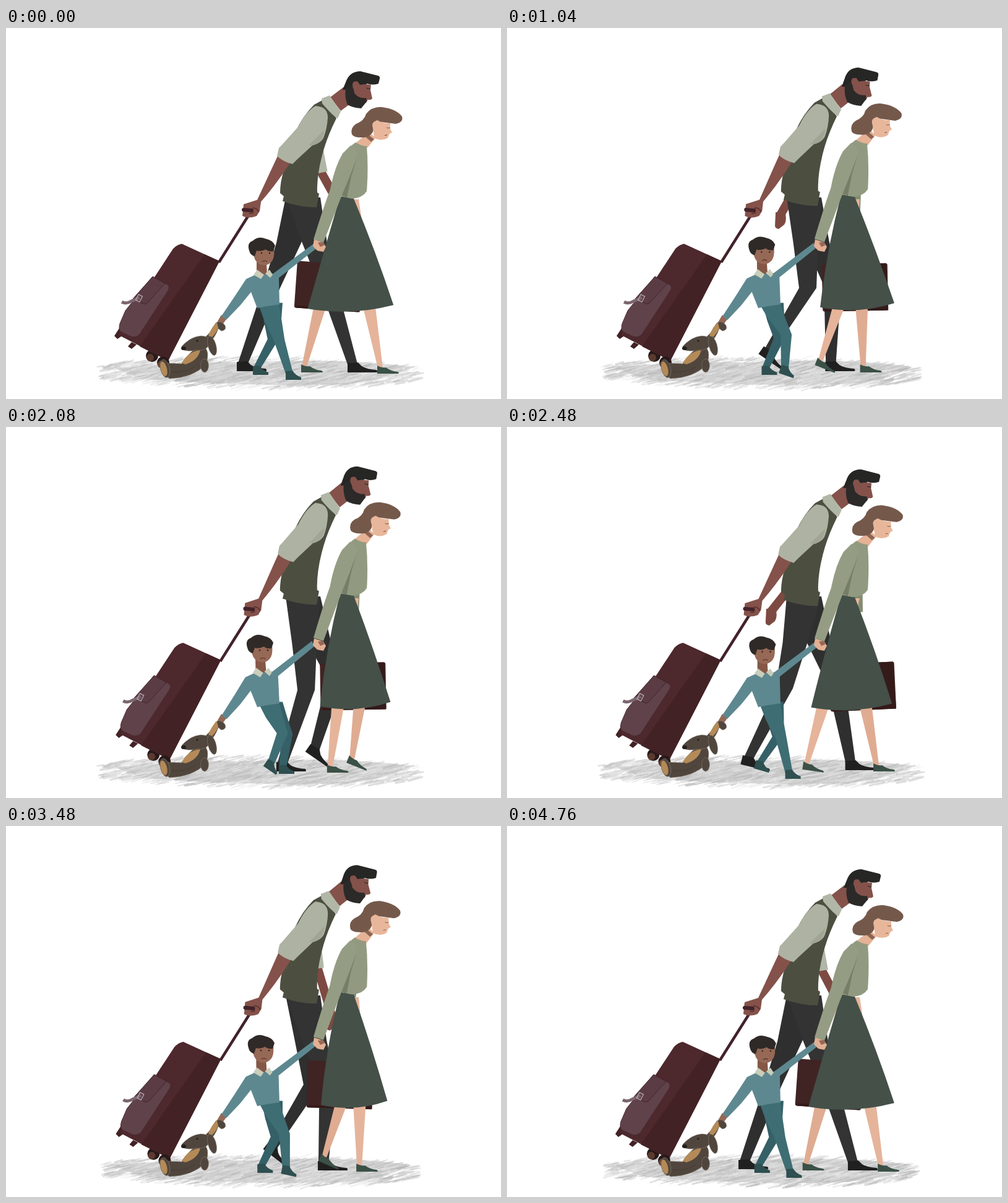
An HTML page for the animation above (4800 ms loop, 800 by 600 pixels).

```html
<!DOCTYPE html>
<html lang="en">
<head>
<meta charset="utf-8">
<title>Family walking</title>
<style>
html, body { margin: 0; width: 100%; height: 100%; overflow: hidden; background: #fff; }
svg { position: absolute; left: 0; top: 0; display: block; }
</style>
</head>
<body>
<svg width="800" height="600" viewBox="0 0 800 600">
  <g id="ground" fill="none" stroke-linecap="round"></g>

  <!-- man -->
  <g>
    <path id="manFarFore" stroke="#7d4a42" stroke-width="14" fill="none" stroke-linejoin="round"/>
    <path id="manFarHand" fill="#7d4a42" d="M-8,-14 L7,-15 Q11,-2 6,6 L-3,13 Q-10,12 -9,6Z"/>
    <path id="manFarSleeve" stroke="#b1b7a6" stroke-width="20" fill="none"/>
  </g>
  <g id="manLegs"></g>
  <g id="manHead">
    <path fill="#84524a" d="M545,96 L524,112 L541,134 L560,120 L562,98Z"/>
    <path fill="#262625" d="M544,100 L549,88 Q555,70 573,70 L601,77 Q605,78 604,82 L602,90 Q592,93 584,90 L570,98 L549,100Z"/>
    <path fill="#84524a" d="M564,88 L568,86 L572,92 Q580,90 590,92 L589,100 L592,114 Q590,117 585,116 L582,121 L560,116Z"/>
    <path fill="#2b2a29" d="M561,90 L549,99 Q547,113 552,124 Q560,129 574,130 L583,119 L582,113 Q570,115 563,105Z"/>
    <path fill="#84524a" d="M568,87 Q560,84 560,93 Q561,101 567,101 L572,92Z"/>
    <path fill="none" stroke="#2b2a29" stroke-width="1.2" d="M583,97 Q586,99 589,98"/>
  </g>
  <g id="manTorso">
    <path fill="#4c4f40" d="M498,124 L511,117 L534,146 Q521,172 514,195 Q502,235 503,266 L506,268 L502,290 Q474,290 447,280 L449,272 L443,267 Q443,245 452,222 Q462,160 498,124Z"/>
    <path fill="#b1b7a6" d="M510,114 L523,109 L541,135 L536,146 Q529,143 511,122Z"/>
  </g>
  <g id="case">
    <path stroke="#42222a" stroke-width="4.5" d="M397,295 L344,379"/>
    <circle cx="236" cy="530" r="10" fill="#281a1a"/><circle cx="233" cy="533" r="6" fill="#5b3a2e"/>
    <path fill="#432225" d="M184,484 L175,498 L180,503 L190,496Z M203,508 L197,515 L203,519 L211,512Z"/>
    <path fill="#4d282d" d="M284,349 L345,377 L262,538 L183,497 L184,488 L270,357 Q277,350 284,349Z"/>
    <path fill="#432225" d="M321,366 L345,377 L262,538 L216,515Z"/>
    <circle cx="254" cy="541" r="10" fill="#281a1a"/><circle cx="251" cy="544" r="6" fill="#6b4633"/>
    <path fill="#60424a" stroke="#4a2c33" stroke-width="1" d="M237,402 L262,416 Q265,420 261,426 L216,495 Q211,501 202,499 L187,492 Q181,489 184,478 L193,457Z"/>
    <path fill="#5b3c45" stroke="#3f242b" stroke-width="1" d="M237,402 L257,413 L229,444 Q225,448 220,445 L205,438Z"/>
    <path fill="none" stroke="#7b6670" stroke-width="5" d="M187,443 Q194,447 202,442 L216,436"/>
    <rect x="-3.5" y="-5" width="7" height="10" transform="translate(215 437) rotate(27)" fill="none" stroke="#b7aab0" stroke-width="1.3"/>
  </g>
  <g id="manArm">
    <path fill="#84524a" d="M441,203 L461,215 Q440,249 412,281 L410,296 L405,304 Q392,309 382,304 L384,285 L406,278 L432,222Z"/>
    <path stroke="#42222a" stroke-width="6" stroke-linecap="round" d="M384,294 L397,295"/>
    <path fill="none" stroke="#5f362f" stroke-width="2" d="M398,291 Q406,291 408,297 M393,300 L400,299"/>
    <path fill="#aeb2a2" d="M500,126 Q520,127 520,145 Q519,163 513,178 Q508,187 495,190 L470,213 L463,220 Q447,216 438,207 L441,194 L445,190 L472,160 Q484,136 500,126Z"/>
    <path fill="#a1a596" d="M514,165 Q512,186 495,190 L489,190Z"/>
  </g>

  <!-- woman -->
  <path id="sleeve" stroke="#848d72" stroke-width="16" fill="none"/>
  <g id="bag">
    <rect x="-53" y="-38" width="106" height="76" rx="3" fill="#402423"/>
    <path fill="#351a1a" d="M20,-38 L51,-38 L53,38 L-50,38 L-50,34 L20,34Z"/>
  </g>
  <g id="womLegs"></g>
  <path id="skirt" fill="#445048"/>
  <g id="womHead">
    <path fill="#e5b296" d="M587,168 L564,187 L584,194 L597,178Z"/>
    <path fill="#8d6453" d="M585,172 L595,180 L590,184 L581,176Z"/>
    <path fill="#74594b" d="M559,172 Q556,161 566,155 Q579,150 582,139 Q591,127 608,128 Q631,131 640,143 Q643,152 630,155 L606,152 Q595,156 594,165 Q590,178 573,177 Q562,177 559,172Z"/>
    <path fill="#e8b79b" d="M600,149 Q610,155 621,154 L621,163 L624,169 L620,171 L617,178 Q606,184 595,178 L593,162 Q590,154 596,151Z"/>
    <path fill="none" stroke="#8a5d4d" stroke-width="1.1" d="M615,161 Q618,163 621,161 M612,174 L616,173"/>
  </g>
  <path id="womTorso" fill="#919a80" d="M565,185 Q575,191 583,191 Q586,225 583,264 Q576,275 559,276 L540,272 L532,240 Q545,198 565,185Z"/>
  <g id="womArm">
    <path fill="#777e67" d="M568,207 L558,240 L551,274 L541,270Z"/>
    <path fill="#949d84" d="M557,190 Q568,194 568,207 Q558,235 543,270 L513,347 L497,342 Q512,293 524,261 Q531,225 544,203Z"/>
  </g>

  <!-- boy -->
  <g id="boyLegs"></g>
  <path fill="#966856" d="M348,464 L356,471 L347,484 L339,486 L341,476Z"/>
  <g id="boyTorso">
    <path fill="#855746" d="M405,378 L421,380 L422,400 L405,398Z"/>
    <path fill="#5e8890" d="M401,400 L432,397 L497,349 L501,357 L441,404 L442,447 Q425,449 406,453 L396,427 L379,448 L356,472 L348,466 L371,432 L388,406Z"/>
    <path fill="#c9cdb9" d="M400,399 L406,391 L417,399 L412,406Z M419,397 L426,391 L431,399 L427,404Z"/>
  </g>
  <g id="boyHead">
    <path fill="#966856" d="M401,354 L433,356 Q435,374 427,380 Q418,387 408,381 Q402,376 401,370 Q397,367 399,361Z"/>
    <path fill="#2f2a27" d="M393,360 Q389,347 399,344 Q408,336 420,341 Q431,343 435,352 L432,361 Q424,362 420,358 Q412,362 405,360 L402,369 Q395,368 393,360Z"/>
    <g fill="#2a1c18"><circle cx="413" cy="364" r="1.2"/><circle cx="426" cy="364" r="1.2"/></g>
    <path fill="none" stroke="#4a2b22" stroke-width="1.1" d="M414,378 Q418,375 422,378"/>
  </g>
  <path fill="#e3b094" d="M498,342 L513,347 L517,354 L513,362 L503,360 L496,353Z"/>
  <path fill="#966856" d="M504,347 L512,346 L515,351 L508,354Z"/>

  <!-- toy dog -->
  <g fill="#50463d" stroke="#8d8375" stroke-width=".5">
    <path d="M260,542 L284,543 Q298,520 318,513 Q331,522 323,544 Q302,566 264,567 Q254,560 260,542Z"/>
    <ellipse cx="321" cy="546" rx="6.5" ry="11"/>
    <path fill="#b48a58" stroke="none" d="M284,542 Q294,523 314,521 Q310,538 290,544Z"/>
    <path d="M318,503 Q331,494 339,477 Q347,472 354,481 Q357,489 348,490 L343,486 Q338,502 327,509Z"/>
    <path fill="#b48a58" stroke="none" d="M327,497 Q333,482 341,476 L343,485 Q338,497 331,501Z"/>
    <path d="M284,515 Q297,500 314,498 Q328,497 330,509 Q325,523 308,521 Q294,524 285,520Z"/>
    <ellipse cx="333" cy="514" rx="6.5" ry="16" transform="rotate(-15 333 514)"/>
    <g transform="rotate(-14 256 551)"><ellipse cx="257" cy="551" rx="7.500" ry="15"/><ellipse cx="255" cy="551" rx="5" ry="12" fill="#b48a58" stroke="none"/></g>
    <ellipse cx="287" cy="518" rx="4" ry="3" fill="#241f1c" stroke="none"/>
    <circle cx="309" cy="506" r="1.4" fill="#1c1816" stroke="none"/>
    <path fill="none" stroke="#3a322b" d="M267,556 Q290,558 305,548"/>
  </g>
</svg>
<script>
const LOOP = 4800, STEP = 40, STRIDE = 1600, BOY_STRIDE = 1200;
const TEXTURES = 'AAABBBCCBB';
const $ = id => document.getElementById(id);
const set = (id, name, value) => $(id).setAttribute(name, value);

const wave = p => Math.cos(2 * Math.PI * p);
const rise = p => .5 - .5 * wave(p);
// How far the foot is off the ground: 0 while planted, a hump in the second half of the stride
const swing = p => {
  const s = (p - Math.floor(p) - .5) / .45;
  return s > 0 && s < 1 ? Math.sin(Math.PI * s) : 0;
};

// half: half widths at hip, thigh, knee, ankle. bend: share of the full knee bend that shows.
const WALKERS = {
  manLegs: {
    thigh: 140, shank: 128, bend: .65, lift: 26, tilt: 40, half: [28, 20, 14, 8],
    shoe: '#202021', foot: 'M-9,-2 L8,-3 L14,3 Q22,8 38,9 Q41,13 37,13 L-9,13Z',
    legs: [{ fill: '#2f2f2f', hip: [480, 288], mid: 471, reach: 89, floor: 542 },
           { fill: '#333', hip: [480, 288], mid: 473, reach: 88, floor: 544 }]
  },
  womLegs: {
    thigh: 131, shank: 128, bend: .5, lift: 13, tilt: 25, half: [13, 13, 12, 4],
    shoe: '#3b5046', foot: 'M-5,-1 Q3,3 9,2 Q17,8 28,9 Q32,12 28,12 L-5,12Z',
    legs: [{ fill: '#dfac92', hip: [550, 290], mid: 541, reach: 59, floor: 545 },
           { fill: '#e5b49b', hip: [557, 290], mid: 543, reach: 62, floor: 547 }]
  },
  boyLegs: {
    thigh: 56, shank: 55, bend: .65, lift: 15, tilt: 35, half: [17, 14, 9, 6],
    shoe: '#2f4f50', foot: 'M-6,-1 L5,-2 Q10,6 19,9 L19,13 L-6,13Z',
    legs: [{ fill: '#356067', hip: [430, 450], mid: 443, reach: 38, floor: 548 },
           { fill: '#3e6d73', hip: [424, 450], mid: 431, reach: 27, floor: 556 }]
  }
};
for (const [id, w] of Object.entries(WALKERS)) {
  $(id).innerHTML = w.legs.map(l => `<g fill="${l.fill}"><path/><path fill="${w.shoe}" d="${w.foot}"/></g>`).join('');
}

// Knee position from hip and ankle, bending forward
function kneeOf([hx, hy], [ax, ay], { thigh, shank, bend }) {
  const dx = ax - hx, dy = ay - hy, d = Math.hypot(dx, dy);
  const along = d >= thigh + shank ? d * thigh / (thigh + shank) : (d * d + thigh * thigh - shank * shank) / (2 * d);
  const out = bend * Math.sqrt(Math.max(0, thigh * thigh - along * along));
  return [hx + (dx * along + dy * out) / d, hy + (dy * along - dx * out) / d];
}

// Draws the far and the near leg half a stride apart; returns the knees
function walk(id, p) {
  const w = WALKERS[id];
  return w.legs.map((l, i) => {
    const q = p + (i ? 0 : .5), up = swing(q);
    const ankle = [l.mid + l.reach * wave(q), l.floor - w.lift * up];
    const knee = kneeOf(l.hip, ankle, w);
    const mid = l.hip.map((v, k) => v + .45 * (knee[k] - v));
    const joints = [[l.hip[0], l.hip[1] - w.thigh / 10], mid, knee, [ankle[0], ankle[1] + 3]];
    const side = s => joints.map(([x, y], k) => `${x + s * w.half[k]},${y}`);
    const [limb, foot] = $(id).children[i].children;
    limb.setAttribute('d', `M${[...side(-1), ...side(1).reverse()].join(' L')}Z`);
    foot.setAttribute('transform', `translate(${ankle}) rotate(${w.tilt * up})`);
    return knee;
  });
}

// Moves a part by one offset at height y0 and another at y1, in proportion between
function sway(id, u, y0, dx0, dy0, y1, dx1, dy1) {
  const c = u * (dx1 - dx0) / (y1 - y0), d = u * (dy1 - dy0) / (y1 - y0);
  set(id, 'transform', `matrix(1 0 ${c} ${1 + d} ${u * dx0 - c * y0} ${u * dy0 - d * y0})`);
}

// One chalky patch of ground
function shade(half, seed) {
  const rnd = () => (seed = (seed * 16807) % 2147483647) / 2147483647;
  let out = '<path fill="#c0c0c0" opacity=".6" d="M175,550 Q280,538 390,541 Q540,533 655,548 Q600,578 500,577 Q350,579 220,567Z"/>';
  for (let i = 0; i < 900; i++) {
    const k = rnd() * 2 - 1, len = 4 + rnd() * 11, slope = len * (.15 + rnd() * .2);
    const x = 411 + k * (half - len);
    const y = 558 + 3 * k + (rnd() * 2 - 1) * 25 * Math.sqrt(1 - .85 * k * k);
    const tone = rnd() < .2 ? 238 : 170 + Math.floor(rnd() * 40);
    out += `<path stroke="rgb(${tone},${tone},${tone})" stroke-width="${.8 + rnd() * 2.4}" opacity="${.2 + rnd() * .3}" d="M${x - len},${y + slope} L${x + len},${y - slope}"/>`;
  }
  return `<g>${out}</g>`;
}
$('ground').innerHTML = shade(264, 7919) + shade(255, 52711) + shade(259, 90001);
const textures = [...$('ground').children];

function drawMan(p, u) {
  walk('manLegs', p);
  sway('manTorso', u, 110, -1.5, -4.5, 288, 0, -3);
  sway('manHead', u, 75, -5.5, -7.5, 125, -2.5, -5.5);
  sway('manArm', u, 130, 0, -4, 298, 3, 0);
  set('case', 'transform', `translate(${2.8 * u} 0)`);

  const turn = wave(p - .03), rad = Math.PI / 180;
  const upper = 11 * turn * rad, lower = (30 * turn - 4) * rad;
  const sx = 494, sy = 152 - 4 * u;
  const ex = sx + 84 * Math.sin(upper), ey = sy + 82;
  const hx = ex + 92 * Math.sin(lower), hy = ey + 90 * Math.cos(lower);
  set('manFarSleeve', 'd', `M${sx},${sy} L${ex},${ey}`);
  set('manFarFore', 'd', `M${sx},${sy} L${ex},${ey} L${hx},${hy - 10}`);
  set('manFarHand', 'transform', `translate(${hx} ${hy})`);
}

function drawWoman(p, u) {
  const knees = walk('womLegs', p);
  const turn = wave(p + .02);
  set('bag', 'transform', `translate(${549 - 28 * turn} ${419 - turn}) rotate(${.5 + 3.5 * turn})`);
  set('sleeve', 'd', `M566,${215 - 5 * u} L${558 - 10 * turn},${300 - 3 * u}`);

  // The leading knee pushes the front hem
  const right = Math.max(knees[0][0], knees[1][0]) + 45 + 10 * swing(p);
  const left = 487 + 25 * u, top = 272 - 4 * u;
  set('skirt', 'd', `M540,${top} Q${514 + 3 * u},360 ${left},${454 - 3 * u} Q${(left + right) / 2},${466 - 3 * u} ${right},${448 - 4 * u} Q${(562 + right) / 2 + 3},360 562,${top + 4}Z`);

  sway('womTorso', u, 185, -1.5, -5.5, 275, .5, -4);
  sway('womArm', u, 205, -1, -5, 350, 0, -1);
  sway('womHead', u, 130, -4, -7.5, 185, -2, -5.5);
}

function drawBoy(p) {
  walk('boyLegs', p);
  const u = rise(2 * p);
  sway('boyTorso', u, 395, -1.5, -1.5, 450, 0, 0);
  set('boyHead', 'transform', `translate(${-3 * u} ${-3 * u})`);
}

function draw(time) {
  const tick = Math.floor((time % LOOP) / STEP), t = tick * STEP;
  const p = t / STRIDE;
  const shown = 'ABC'.indexOf(TEXTURES[tick % TEXTURES.length]);
  textures.forEach((g, i) => { g.style.display = i === shown ? '' : 'none'; });
  drawMan(p, rise(2 * p + .04));
  drawWoman(p, rise(2 * p + .04));
  drawBoy(t / BOY_STRIDE);
}

const start = performance.now();
function loop() {
  draw(performance.now() - start);
  requestAnimationFrame(loop);
}
loop();
</script>
</body>
</html>
```
